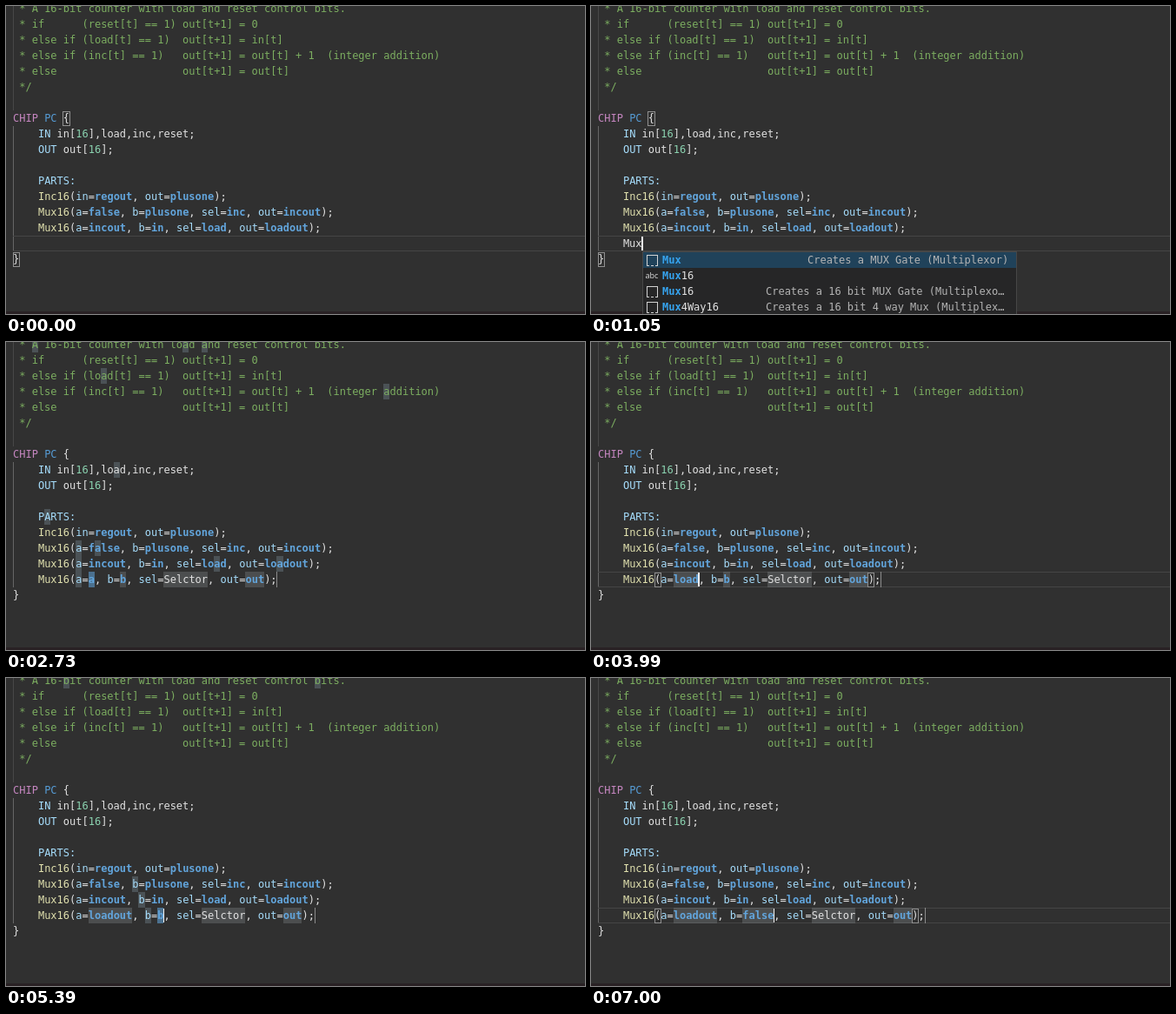
An HTML page that plays this animation: 666x354 px, repeating every 7070 ms.

```html
<!DOCTYPE html>
<html lang="en">
<head>
<meta charset="utf-8">
<title>Snippet completion in an HDL editor</title>
<style>
html, body { margin: 0; width: 100%; height: 100%; overflow: hidden; background: #303030; }
#stage {
  position: relative; width: 666px; height: 354px; overflow: hidden; background: #303030;
  font: 12px/18px "DejaVu Sans Mono", "Liberation Mono", monospace; color: #e2e2e2;
}
#stage div { position: absolute; box-sizing: border-box; white-space: pre; }
#stage span { font-style: normal; }
.comment { color: #7cae60; }
.kw { color: #c586c0; }
.name { color: #569cd6; }
.prop { color: #a5dcfb; }
.num { color: #8bd3b0; }
.fn { color: #e0e0ae; }
.val { color: #62a5dc; font-weight: bold; }
.guide { width: 1px; left: 8px; }
.row { border: solid #454545; border-width: 1px 0; }
.match { background: rgba(112, 128, 138, .42); }
.field { background: rgba(130, 134, 138, .34); }
.picked { background: #4b7190; }
.bracket { border: 1px solid #909090; }
.stop { background: #8c8c8c; }
.caret { background: #f4f4f4; }
.popup { background: #262627; border: 1px solid #474747; overflow: hidden; }
.active { background: #20425a; }
.hit { color: #36a3ee; font-weight: bold; }
.detail { color: #b4b4b4; }
.box { border: 1px solid #d2d2d2; border-bottom-style: dashed; }
.abc { font: 9px/18px "Open Sans", Inter, sans-serif; }
</style>
</head>
<body>
<div id="stage"></div>
<script>
const LOOP = 7070, CW = 7.224, LH = 18, LEFT = 8, TOP = -6, EDIT = 15;
const stage = document.getElementById('stage');

const comment = [
  ' * A 16-bit counter with load and reset control bits.',
  ' * if      (reset[t] == 1) out[t+1] = 0',
  ' * else if (load[t] == 1)  out[t+1] = in[t]',
  ' * else if (inc[t] == 1)   out[t+1] = out[t] + 1  (integer addition)',
  ' * else                    out[t+1] = out[t]',
  ' */'
];
const code = [
  '', 'CHIP PC {', '    IN in[16],load,inc,reset;', '    OUT out[16];', '', '    PARTS:',
  '    Inc16(in=regout, out=plusone);',
  '    Mux16(a=false, b=plusone, sel=inc, out=incout);',
  '    Mux16(a=incout, b=in, sel=load, out=loadout);'
];

// time, typed word | time, value of a, value of b, field being edited
const steps = [
  [0, ''], [350, 'M'], [490, 'Mu'], [630, 'Mux'], [1470, 'Mux1'], [2240, 'a', 'b', 0]
];
const typeField = (text, times, step) =>
  times.forEach((t, i) => steps.push([t, ...step(text.slice(0, i + 1))]));
typeField('loadout', [3290, 3430, 3570, 3710, 4340, 4550, 4760], s => [s, 'b', 0]);
steps.push([5110, 'loadout', 'b', 1]);
typeField('false', [5600, 5810, 6090, 6580, 6790], s => ['loadout', s, 1]);
const PICK = 1960;

const x = col => LEFT + col * CW;
const y = line => TOP + line * LH;
const span = (cls, s) => `<span class="${cls}">${s}</span>`;
const box = (cls, l, t, w, h, body = '') =>
  `<div class="${cls}" style="left:${l}px;top:${t}px;width:${w}px;height:${h}px">${body}</div>`;
const label = (cls, l, t, s) => `<div class="${cls}" style="left:${l}px;top:${t}px">${s}</div>`;
const cells = (cls, line, col, n) => box(cls, x(col), y(line), n * CW, LH);
const bracket = (line, col) => box('bracket', x(col) - .5, y(line) + 1, CW + 1, LH - 1);

function paint(s) {
  if (s.includes('(')) {
    return s
      .replace(/(\w+)=(\w+)/g, (_, k, v) =>
        span('prop', k) + '=' + (v === 'Selctor' ? v : span('val', v)))
      .replace(/^(\s+)(\w+)(?=\()/, (_, pad, f) => pad + span('fn', f));
  }
  return s
    .replace(/\d+(?=\])/, n => span('num', n))
    .replace(/^(CHIP) (PC)/, (_, k, n) => span('kw', k) + ' ' + span('name', n))
    .replace(/^(\s+)(IN|OUT|PARTS:)/, (_, pad, k) => pad + span('prop', k));
}

// Mark the typed letters in order inside a suggestion
function markHits(name, typed) {
  let k = 0;
  return [...name].map(c => c === typed[k] ? (k++, span('hit', c)) : c).join('');
}

function popup(typed, pick) {
  const one = ['Mux', 'Creates a MUX Gate (Multiplexor)'];
  const word = ['Mux16'];
  const wide = ['Mux16', 'Creates a 16 bit MUX Gate (Multiplexo…'];
  const ways = n => [`Mux${n}Way16`, `Creates a 16 bit ${n} way Mux (Multiplex…`];
  const rows = typed === 'Mux1' ? [word, wide, ways(4), ways(8)] : [one, word, wide, ways(4)];
  const body = rows.map(([name, detail], i) => {
    const t = i * LH;
    return (i === pick ? box('active', 0, t, 430, LH) : '') +
      (detail ? box('box', 3.5, t + 3, 13, 13) : label('abc', 2, t, 'abc')) +
      label('', 21.5, t, markHits(name, typed)) +
      (detail ? label('detail', name === 'Mux' ? 188.5 : 140.5, t, detail) : '');
  }).join('');
  return box('popup', x(4 + typed.length) + .9, 282, 431, 90, body);
}

function matches(lines, letter) {
  let out = '';
  lines.forEach((s, line) => [...s].forEach((c, col) => {
    if (c.toLowerCase() === letter) out += cells('match', line, col, 1);
  }));
  return out;
}

function draw(step, caretOn, pick) {
  const [, first, second, field] = step;
  const snippet = field !== undefined;
  const text = snippet
    ? `    Mux16(a=${first}, b=${second}, sel=Selctor, out=out);`
    : '    ' + first;
  const lines = [...comment, ...code, text, '}'];
  const selected = snippet && [first, second][field] === 'ab'[field];
  let caret = 4 + first.length;
  if (snippet) caret = 12 + first.length + (field ? 4 + second.length : 0);

  let html = box('guide', 8, 0, 1, 120).replace('style="', 'style="background:#474747;') +
    box('guide', 8, 138, 1, 144).replace('style="', 'style="background:#666;');
  if (!selected) html += box('row', 8, y(EDIT), 658, LH);
  if (selected) html += matches(lines, 'ab'[field]);
  if (snippet) {
    for (const m of text.matchAll(/=(\w+)/g)) html += cells('field', EDIT, m.index + 1, m[1].length);
    if (selected) html += cells('picked', EDIT, caret - 1, 1);
    else html += bracket(EDIT, 9) + bracket(EDIT, text.length - 2);
    html += box('stop', Math.round(x(text.length)), y(EDIT), 1, LH);
  } else {
    html += bracket(7, 8) + bracket(16, 0);
  }
  lines.forEach((s, i) => {
    html += label(i < comment.length ? 'comment' : '', LEFT, y(i), i < comment.length ? s : paint(s));
  });
  if (caretOn) html += box('caret', x(caret) - .5, y(EDIT) + 1, 1.6, LH - 2);
  html += box('', 0, 351, 666, 3).replace('style="', 'style="background:#292124;');
  if (!snippet && first) html += popup(first, pick);
  stage.innerHTML = html;
}

let shown = '';
function tick() {
  const t = performance.now() % LOOP;
  let i = steps.length - 1;
  while (steps[i][0] > t) i--;
  const caretOn = i > 0 && (t - steps[i][0]) % 1000 < 490;
  const pick = steps[i][1] === 'Mux1' && t >= PICK ? 1 : 0;
  const key = [i, caretOn, pick].join();
  if (key !== shown) {
    shown = key;
    draw(steps[i], caretOn, pick);
  }
  requestAnimationFrame(tick);
}
tick();
</script>
</body>
</html>
```
